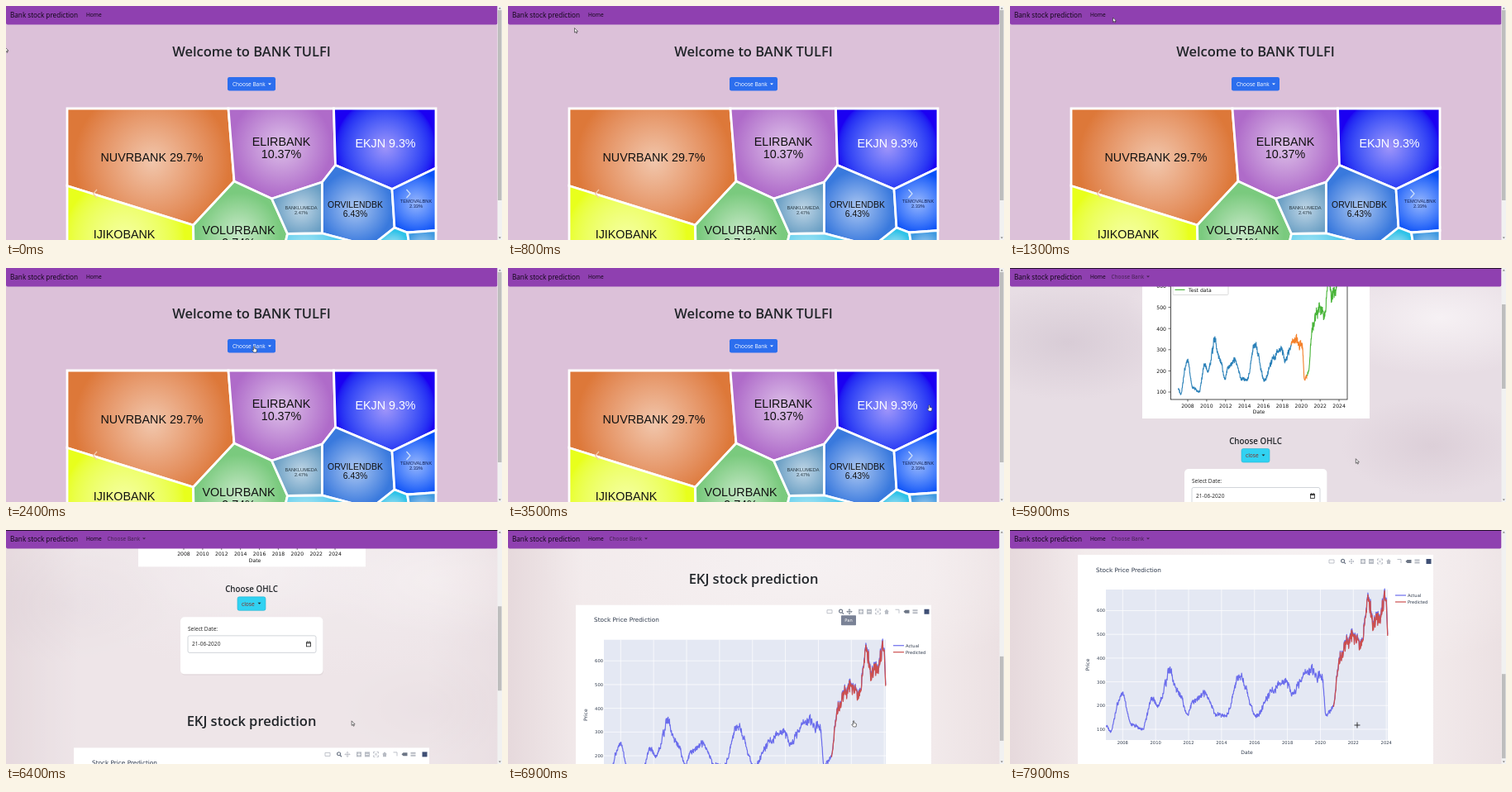
Recreate the animation shown at these times as an HTML page. Size 600 by 283 pixels, loop 8 s.

```html
<!DOCTYPE html>
<html lang="en">
<head>
<meta charset="utf-8">
<title>Bank stock prediction</title>
<style>
html, body { margin: 0; width: 100%; height: 100%; overflow: hidden; background: #dcc1d9; }
#haze, #stripes { position: absolute; inset: 0; }
#haze {
  background:
    radial-gradient(ellipse 130px 70px at 70px 90px, #d8ccd6, transparent),
    radial-gradient(ellipse 150px 70px at 520px 60px, #f6f1f4, transparent),
    radial-gradient(ellipse 110px 60px at 510px 215px, #dccfd8, transparent),
    radial-gradient(ellipse 160px 70px at 300px 50px, #f3eef1, transparent), #e7dde4;
}
#stripes {
  background:
    radial-gradient(ellipse 320px 140px at 360px 40px, #f6f1f2, transparent),
    linear-gradient(90deg, #e6d9dc, #f2eaeb 15%, #f2eaeb 85%, #ebe0e2);
}
svg { position: absolute; left: 0; top: 0; display: block; }
.ui { font-family: "Open Sans", "Noto Sans", sans-serif; }
.arial { font-family: "Liberation Sans", Arial, sans-serif; }
.plot { font-family: "DejaVu Sans", Verdana, sans-serif; }
</style>
</head>
<body>
<div id="haze"></div>
<div id="stripes"></div>
<svg id="stage" width="600" height="283" viewBox="0 0 600 283">
  <defs id="defs"></defs>
  <g id="home"></g>
  <g id="bank"></g>
  <g id="nav"></g>
  <g id="bar"></g>
  <g id="cursors"></g>
</svg>
<script>
const $ = id => document.getElementById(id);
const home = $("home"), bank = $("bank"), nav = $("nav"), bar = $("bar"), cursors = $("cursors");

function el(parent, tag, attrs) {
  const node = document.createElementNS("http://www.w3.org/2000/svg", tag);
  for (const k in attrs) node.setAttribute(k, attrs[k]);
  parent.appendChild(node);
  return node;
}
const rect = (p, x, y, width, height, fill, more) => el(p, "rect", { x, y, width, height, fill, ...more });
const path = (p, d, stroke, w = 1, fill = "none", more) =>
  el(p, "path", { d, stroke, "stroke-width": w, fill, ...more });
function text(p, str, x, y, size, fill, cls, anchor = "start", more) {
  const node = el(p, "text", { x, y, "font-size": size, fill, class: cls, "text-anchor": anchor, ...more });
  node.textContent = str;
  return node;
}
const caret = (p, x, y, fill) => path(p, `M${x} ${y}h4l-2 2z`, "none", 0, fill);
const heading = (p, str, y, size = 16.5) =>
  text(p, str, 297, y, size, "#212529", "ui", "middle", { "font-weight": 600 });

// Eased interpolation through keys of the form [time, value, ...]
function track(keys, t) {
  let i = 0;
  while (i < keys.length - 2 && t >= keys[i + 1][0]) i++;
  const a = keys[i], b = keys[i + 1];
  const f = Math.min(1, Math.max(0, (t - a[0]) / (b[0] - a[0])));
  return a.slice(1).map((v, j) => v + (b[j + 1] - v) * f * f * (3 - 2 * f));
}

// ---- home page
rect(home, 0, 0, 600, 283, "#dcc1d9");
heading(home, "Welcome to BANK TULFI", 61);
rect(home, 268, 86, 58, 16.5, "#2c6eee", { rx: 2.2 });
text(home, "Choose Bank", 274, 97, 6.5, "#fff", "ui");
caret(home, 317, 93.5, "#fff");

// Cells share their corners; white strokes make the gaps.
const corners = {
  a: [74, 124], b: [269, 124], c: [396.5, 124], d: [520, 124], e: [276, 212], f: [226.5, 265],
  g: [74, 217.5], h: [321.5, 233], i: [382.5, 213], j: [398.5, 192.5], k: [467, 221.5], l: [520, 196],
  m: [340.5, 275.5], n: [382.5, 275], o: [470, 268], p: [485.5, 274], q: [520, 271.5], r: [446, 287],
  s: [74, 290], t: [227, 290], u: [337, 290], v: [424, 286], w: [488, 290], x: [520, 290]
};
function cell(ids, color, cx, cy, size, lines = [], ink = "#111") {
  const points = [...ids].map(c => corners[c]);
  const r = 0.78 * Math.max(...points.map(([x, y]) => Math.hypot(x - cx, y - cy)));
  const grad = el($("defs"), "radialGradient", { id: "cell-" + ids, gradientUnits: "userSpaceOnUse", cx, cy, r });
  el(grad, "stop", { offset: 0, "stop-color": `color-mix(in srgb, ${color} 42%, white)` });
  el(grad, "stop", { offset: 1, "stop-color": color });
  el(home, "polygon", { points: points.join(" "), fill: `url(#cell-${ids})`, stroke: "#fff", "stroke-width": 2.8 });
  lines.forEach((s, n) => text(home, s, cx, cy + n * size * 1.06, size, ink, "arial", "middle"));
}
cell("abefg", "#dd7839", 176.5, 188, 14.3, ["NUVRBANK 29.7%"]);
cell("bcjihe", "#af6bc9", 333, 169, 14.3, ["ELIRBANK", "10.37%"]);
cell("cdlkj", "#1b00f2", 459, 171, 14.3, ["EKJN 9.3%"], "#fff");
cell("gfts", "#e8ff1c", 143, 281, 14.3, ["IJIKOBANK"]);
cell("ehmutf", "#7aca7e", 281.5, 276, 14.3, ["VOLURBANK", "9.74%"]);
cell("hinm", "#6a9fc4", 357, 246, 5.7, ["BANKLUMEDA", "2.47%"], "#2a3a44");
cell("ijkorvn", "#3979dd", 422.5, 244, 10.4, ["ORVILENDBK", "6.43%"]);
cell("klqpo", "#0750f7", 496, 238, 5.7, ["TEMOVALBNK", "2.33%"], "#102050");
cell("mnvu", "#2fc3e8", 362, 295, 0);
cell("opwr", "#2fc3e8", 468, 292, 0);
cell("pqxw", "#3c98e0", 504, 292, 0);
path(home, "M110 222l-4.5 5 4.5 5", "#f3c9ac", 1.2);
path(home, "M484.5 222l4.5 5-4.5 5", "#cfe0fa", 1.2);

// ---- price series: turning points plus a seeded random walk
const turns = [
  [2007, 120], [2007.25, 95], [2007.95, 245], [2008.55, 120], [2009.2, 98], [2009.8, 235], [2010.1, 195],
  [2010.85, 335], [2011.3, 260], [2011.95, 165], [2012.2, 215], [2013, 240], [2013.7, 165], [2014.3, 160],
  [2015.05, 320], [2016.1, 165], [2017, 260], [2017.85, 320], [2018.25, 255], [2019.45, 355],
  [2020.1, 320], [2020.35, 158], [2020.8, 200], [2021.1, 390], [2021.9, 510], [2022.4, 455],
  [2022.95, 615], [2023.2, 540], [2024, 645]
];
let seed = 11;
const noise = size => ((seed = (seed * 16807) % 2147483647) / 2147483647 * 2 - 1) * size;
const prices = [];
for (let i = 0, drift = 0; i <= 850; i++) {
  const year = 2007 + i * 0.02;
  drift = drift * 0.85 + noise(0.03);
  prices.push([year, track(turns, year)[0] * (1 + drift + noise(0.045))]);
}
const line = (data, from, to, px, py) => "M" + data
  .filter(d => d[0] >= from && d[0] <= to)
  .map(d => px(d[0]).toFixed(1) + " " + py(d[1]).toFixed(1)).join("L");

// ---- data split chart
heading(bank, "EKJ data split", 61);
rect(bank, 160, 86.5, 275, 206.5, "#fff");
text(bank, "EKJ", 301, 107.5, 7.2, "#111", "plot", "middle");
const sx = y => 215 + (y - 2008) * 11.44, sy = v => 261 - (v - 100) * 0.256;
const parts = [
  ["Train data", "#2a80b8", 2007, 2018.96],
  ["Validation data", "#f5812a", 2018.94, 2020.66],
  ["Test data", "#48b438", 2020.64, 2024.01]
];
parts.forEach(([, c, a, b]) => path(bank, line(prices, a, b, sx, sy), c, 1.1));
rect(bank, 194.5, 111.5, 213.5, 158.5, "none", { stroke: "#222", "stroke-width": 0.8 });
for (let y = 2008; y <= 2024; y += 2) {
  path(bank, `M${sx(y)} 270v2.5`, "#222", 0.7);
  text(bank, y, sx(y), 279.5, 6.1, "#111", "plot", "middle");
}
for (let v = 100; v <= 600; v += 100) {
  path(bank, `M194 ${sy(v)}h-2.5`, "#222", 0.7);
  text(bank, v, 189, sy(v) + 2.3, 6.1, "#111", "plot", "end");
}
text(bank, "Date", 301, 287.2, 6.1, "#111", "plot", "middle");
rect(bank, 197, 114, 67, 29.5, "#fff", { rx: 1.2, stroke: "#ccc", "stroke-width": 0.7 });
parts.forEach(([name, c], i) => {
  path(bank, `M199.5 ${119.3 + i * 9}h12`, c, 1.2);
  text(bank, name, 216, 121.5 + i * 9, 6.1, "#111", "plot");
});

// ---- form
heading(bank, "Choose OHLC", 323.7, 9.8);
rect(bank, 280, 329.5, 34, 16.5, "#31d2f2", { rx: 2.2, stroke: "#25b4d2", "stroke-width": 0.6 });
text(bank, "close", 285, 340.3, 6.6, "#8a2a20", "ui");
caret(bank, 304.5, 336.5, "#222");
rect(bank, 212, 355.5, 172, 69, "#000", { rx: 5, opacity: 0.05 });
rect(bank, 211, 354, 172.5, 69, "#fff", { rx: 5 });
text(bank, "Select Date:", 220, 370.8, 6.6, "#222", "ui");
rect(bank, 220, 376.5, 155, 20.5, "#fff", { rx: 2, stroke: "#c6cbd1", "stroke-width": 0.8 });
text(bank, "21-06-2020", 225, 388.8, 6.6, "#222", "ui");
rect(bank, 363.5, 384.5, 5, 5, "none", { stroke: "#222", "stroke-width": 0.8 });
path(bank, "M363.5 385.5h5M364.8 384v-1M367.2 384v-1", "#222", 0.9);

// ---- prediction chart
const ink = "#2f3a4c";
heading(bank, "EKJ stock prediction", 486);
rect(bank, 82, 512, 430, 270, "#fff");
text(bank, "Stock Price Prediction", 104, 532.7, 7.3, ink, "plot");
rect(bank, 116, 554, 341, 182, "#e4e8f3");
const tx = y => 136.3 + (y - 2008) * 19.93, ty = v => 723 - (v - 100) * 0.287;
for (let y = 2008; y <= 2024; y += 2) {
  path(bank, `M${tx(y)} 554v182`, "#fff", 0.7);
  text(bank, y, tx(y), 741, 5.2, ink, "plot", "middle");
}
for (let v = 100; v <= 600; v += 100) {
  path(bank, `M116 ${ty(v)}h341`, "#fff", 0.7);
  text(bank, v, 115, ty(v) + 1.9, 5.2, ink, "plot", "end");
}
text(bank, "Date", 286.5, 752.5, 6, ink, "plot", "middle");
text(bank, "Price", 0, 0, 6, ink, "plot", "middle", { transform: "translate(95.5 645) rotate(-90)" });
const actual = prices.concat([[2024.08, 500]]);
const guess = actual.map(([y, v]) => [y, v * 0.988]);
const blue = "#6a6cec", red = "#cc4f4f";
path(bank, line(actual, 2007, 2025, tx, ty), blue, 1.2, "none", { "stroke-linejoin": "round" });
path(bank, line(guess, 2020.8, 2025, tx, ty), red, 1.3, "none", { "stroke-linejoin": "round" });
[["Actual", blue], ["Predicted", red]].forEach(([name, c], i) => {
  path(bank, `M466 ${561 + i * 8}h13`, c, 1.2);
  text(bank, name, 481, 563 + i * 8, 5.2, ink, "plot");
});

// chart toolbar, icons drawn around their centres
const grey = "#b8bcc4", dark = "#6d7686";
const icon = (x, d, stroke = grey, w = 0.9, fill = "none") =>
  path(bank, d, stroke, w, fill, { transform: `translate(${x} 520)` });
const square = "M-3-3h6v6h-6z";
icon(389, "M-3-2h6v4h-6z");
icon(403, "M1.6-.6a2 2 0 1 1-4 0a2 2 0 1 1 4 0M1 .9l2 2", dark, 1.2);
const panIcon = icon(413, "M-3 0h6M0-3v6M-2-1l-1 1 1 1M2-1l1 1-1 1M-1-2l1-1 1 1M-1 2l1 1 1-1");
icon(427, square, "none", 0, grey);
icon(427, "M-2 0h4M0-2v4", "#fff");
icon(437, square, "none", 0, grey);
icon(437, "M-2 0h4", "#fff");
icon(447.5, "M-3-1v-2h2M1-3h2v2M3 1v2h-2M-1 3h-2v-2M-1.5-1.5l3 3M1.5-1.5l-3 3");
icon(458, "M-3 0l3-3 3 3h-1v3h-4v-3z", "none", 0, grey);
icon(471, "M-2.5-2.5h4.5v4.5");
icon(482, "M-3.5 0l2-2h5v4h-5z", "none", 0, dark);
icon(492.5, "M-3-1.5h6M-3 1.5h6", grey, 2);
icon(506.5, square, "none", 0, "#3f4f75");
const tip = el(bank, "g", {});
rect(tip, 403, 524.5, 18, 12, "#7a8296", { rx: 0.8 });
text(tip, "Pan", 412, 532.5, 5.2, "#fff", "plot", "middle");

// ---- navigation and scrollbar
path(nav, "M0 0H594.5V20.5q0 2-2 2H2q-2 0-2-2z", "none", 0, "#8f40b0");
text(nav, "Bank stock prediction", 5, 13.8, 8.2, "#0c0510", "ui");
text(nav, "Home", 97, 13.2, 6.6, "#0c0510", "ui");
const navMore = el(nav, "g", {});
text(navMore, "Choose Bank", 122.5, 13.2, 6.5, "#43214f", "ui");
caret(navMore, 165, 9.5, "#43214f");
rect(navMore, 0, 0, 600, 1, "#24122c");
rect(bar, 594.5, 0, 5.5, 283, "#f1f1f1");
path(bar, "M595.8 3.5h3l-1.5-1.8zM595.8 279.5h3l-1.5 1.8z", "none", 0, "#777");
const thumb = rect(bar, 595, 5, 4.5, 230, "#bdbdbd");

// ---- pointers, each drawn around its hot spot
const pointers = {
  arrow: path(cursors, "M0 0v5.5l1.3-1.1.9 2 .9-.4-.9-1.9h1.8z", "#222", 0.6, "#fff"),
  hand: path(cursors, "M-.6 0q.7-.7 1.3 0v2.5l2.3.6q.6.3.5 1L3 7H-.3l-2-2.6q.3-.9 1.7 0z", "#222", 0.6, "#fff"),
  cross: path(cursors, "M-3.5 0h7M0-3.5v7", "#222", 0.9)
};

// ---- motion
const pointerKeys = [
  [0, -1, 50], [200, -1, 50], [1200, 124.5, 14], [1400, 124.5, 14], [2000, 300, 95], [2500, 300, 95],
  [3300, 509.5, 166], [3600, 509.5, 166], [4300, 417.5, 233], [5000, 418.5, 230.5],
  [7200, 418, 231], [7600, 420, 236]
];
const scrollKeys = [[4700, 0], [5500, 111], [6050, 111], [6550, 286], [6680, 286], [7031, 482]];
const show = (node, on) => node.setAttribute("display", on ? "inline" : "none");

function draw(t) {
  const second = t >= 3600;
  const [scroll] = track(scrollKeys, t);
  const [x, y] = track(pointerKeys, t);
  show(home, !second);
  show(bank, second);
  show(navMore, second);
  $("stripes").style.opacity = Math.min(1, Math.max(0, (scroll - 111) / 200));
  bank.setAttribute("transform", `translate(0 ${-scroll.toFixed(2)})`);
  thumb.setAttribute("y", 5 + scroll * 0.351);
  thumb.setAttribute("height", second ? 102 : 230);

  const hover = t >= 6550 && t < 7100;
  show(tip, hover);
  panIcon.setAttribute("stroke", hover ? dark : grey);

  const overButton = x > 268 && x < 326 && y > 86 && y < 103;
  const overNext = x > 453 && y > 124;
  let kind = "arrow";
  if (hover || (!second && (overButton || overNext))) kind = "hand";
  else if (t >= 7100) kind = "cross";
  for (const k in pointers) show(pointers[k], k === kind);
  cursors.setAttribute("transform", `translate(${x.toFixed(2)} ${y.toFixed(2)})`);
}

const start = performance.now();
function tick() {
  draw((performance.now() - start) % 8000);
  requestAnimationFrame(tick);
}
draw(0);
requestAnimationFrame(tick);
</script>
</body>
</html>
```
